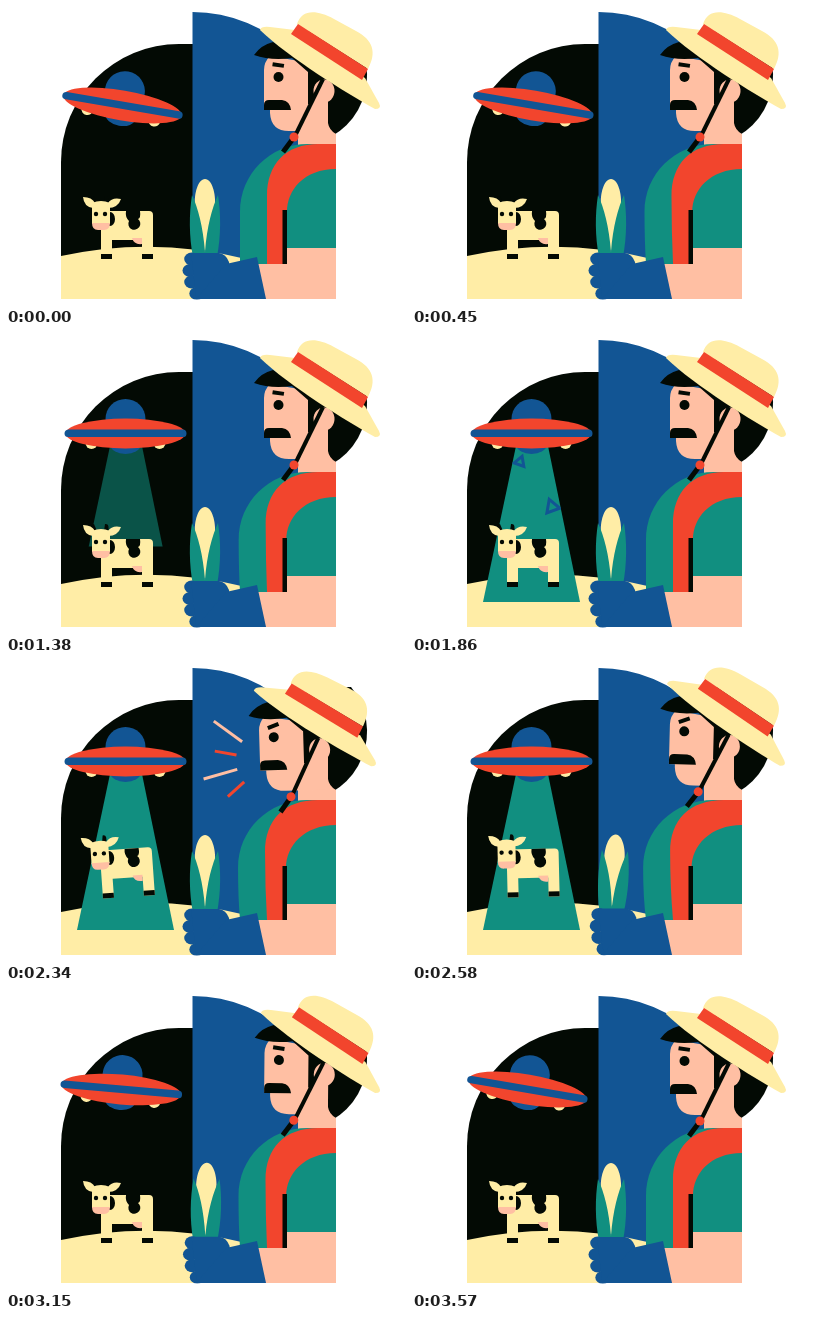
Write an HTML page with a canvas that moves like this. It is 400 px wide and 300 px high and loops after 3600 ms.

```html
<!DOCTYPE html>
<html lang="en">
<head>
<meta charset="utf-8">
<title>Farmer and saucer</title>
<style>
  html, body { margin: 0; width: 100%; height: 100%; overflow: hidden; background: #fff; }
  canvas { display: block; width: 400px; height: 300px; }
</style>
</head>
<body>
<canvas id="stage"></canvas>
<script>
const LOOP = 3600;
const CREAM = '#ffeda6', RED = '#f2452d', BLUE = '#125594', TEAL = '#118f80', PINK = '#ffbfa3', BLACK = '#030a04';

const canvas = document.getElementById('stage');
const ctx = canvas.getContext('2d');
const ratio = window.devicePixelRatio || 1;
canvas.width = 400 * ratio;
canvas.height = 300 * ratio;

// Smooth step from 0 at time a to 1 at time b.
function ease(t, a, b) {
  const p = Math.min(1, Math.max(0, (t - a) / (b - a)));
  return (1 - Math.cos(Math.PI * p)) / 2;
}

// Rises between a and b, falls between c and d.
function pulse(t, a, b, c, d) {
  return ease(t, a, b) - ease(t, c, d);
}

function shape(color, d) {
  ctx.fillStyle = color;
  ctx.fill(new Path2D(d));
}

function rect(color, x, y, w, h) {
  ctx.fillStyle = color;
  ctx.fillRect(x, y, w, h);
}

function oval(color, x, y, rx, ry = rx) {
  ctx.fillStyle = color;
  ctx.beginPath();
  ctx.ellipse(x, y, rx, ry, 0, 0, Math.PI * 2);
  ctx.fill();
}

function line(color, width, x0, y0, x1, y1) {
  ctx.strokeStyle = color;
  ctx.lineWidth = width;
  ctx.beginPath();
  ctx.moveTo(x0, y0);
  ctx.lineTo(x1, y1);
  ctx.stroke();
}

// Runs draw with the picture moved by dx, dy and turned about a pivot.
function posed(dx, dy, angle, px, py, draw) {
  ctx.save();
  ctx.translate(px + dx, py + dy);
  ctx.rotate(angle);
  ctx.translate(-px, -py);
  draw();
  ctx.restore();
}

function background() {
  shape(BLACK, 'M55 293V156A118 118 0 0 1 173 38H188V293Z');
  shape(BLUE, 'M186.5 6A144 144 0 0 1 330 150V293H186.5Z');
  shape(BLACK, 'M300 25H345A70 70 0 0 1 300 139Z');
  shape(CREAM, 'M55 250Q147 230 240 253V293H55Z');
}

function beam(t) {
  const alpha = pulse(t, 1180, 1560, 2640, 2980);
  if (alpha <= 0) return;
  const bottom = 118 + 150 * Math.min(1, Math.max(0, (t - 1230) / 240));
  ctx.save();
  ctx.globalAlpha = alpha;
  ctx.beginPath();
  ctx.rect(60, 110, 120, bottom - 110);
  ctx.clip();
  const cone = 'M104 112H136L168 268H71Z';
  shape(TEAL, cone);
  ctx.clip(new Path2D(cone));
  if (t > 1600 && t < 2300) {
    triangle(108, 128, 6, t, 1);
    triangle(140, 173, 8, t, -1);
  }
  ctx.restore();
}

function triangle(x, y, r, t, spin) {
  const age = t - 1860;
  posed(x, y - age * .12, spin * (.35 + age * .002), 0, 0, () => {
    ctx.strokeStyle = BLUE;
    ctx.lineWidth = 3;
    ctx.beginPath();
    for (let i = 0; i < 3; i++) {
      const a = i * Math.PI * 2 / 3 - Math.PI / 2;
      ctx.lineTo(r * Math.cos(a), r * Math.sin(a));
    }
    ctx.closePath();
    ctx.stroke();
  });
}

function saucer(t) {
  const roaming = 1 - pulse(t, 870, 1220, 2960, 3330);
  const sway = 7 * Math.sin(t / 1200 * Math.PI * 2) - 3;
  posed(119.5 + roaming * sway, 99, roaming * .17, 0, 0, () => {
    oval(BLUE, 0, -14, 20);
    oval(BLUE, 0, 12, 15, 9);
    for (const side of [-1, 1]) oval(CREAM, side * 34, 10, 6);
    oval(RED, 0, .5, 60, 15);
    shape(BLUE, 'M-57 -3.5H57Q61 -3.5 61 .5T57 4H-57Q-61 4 -61 .5T-57 -3.5Z');
  });
}

function cow(t) {
  const lift = pulse(t, 1900, 2240, 2880, 3120);
  const tilt = pulse(t, 1950, 2300, 2340, 2740);
  posed(0, -18 * lift, -.07 * tilt, 118, 225, () => {
    shape(CREAM, 'M95 205H143Q147 205 147 209V253H136V234H106V253H95Z');
    for (const x of [95, 136]) rect(BLACK, x, 248, 11, 5);
    shape(PINK, 'M126 232H136V238Q128 239 126 232Z');
    shape(BLACK, 'M120 205H134Q135 212 132 213A6 6 0 1 1 123 215Q119 211 120 205Z');
    oval(BLACK, 104, 213, 5, 7);
    shape(BLACK, 'M86 198Q83 190 88 190L91 197ZM98 197L99 190Q104 189 102 198Z');
    shape(CREAM, 'M87 202Q78 201 77 191Q86 191 89 197ZM102 197Q106 191 115 193Q112 202 102 202Z');
    shape(CREAM, 'M86 197Q95 193 104 197V218H86Z');
    shape(PINK, 'M86 217H104Q104 224 98 224H92Q86 224 86 217Z');
    for (const x of [90, 99]) oval(BLACK, x, 208, 2.2);
  });
}

// Rays that shoot out of the mouth.
function shout(t) {
  const head = ease(t, 2160, 2300), tail = ease(t, 2360, 2530);
  if (head <= tail) return;
  for (let i = 0; i < 4; i++) {
    const angle = (216 - 26 * i) * Math.PI / 180;
    const reach = i % 2 ? 22 : 35;
    const at = p => [262 + (32 + reach * p) * Math.cos(angle), 98.5 + (32 + reach * p) * Math.sin(angle)];
    line(i % 2 ? RED : PINK, 3, ...at(tail), ...at(head));
  }
}

function body(t) {
  const s = 3 * (1 - Math.cos(t / 1800 * Math.PI * 2)) / 2;
  rect(PINK, 250, 241, 80, 52);
  shape(PINK, 'M292 110V140H330V128Q323 124 322 117V88H300Z');
  shape(TEAL, `M234 258Q${234 - s} 235 ${234 - s} 206C${234 - s} 168 ${264 - s} 138 302 138H330V242H281V258Z`);
  shape(RED, `M261 258Q${261 - s} 225 ${261 - s} 190C${261 - s} 158 ${280 - s} 138 312 138H330V163C298 163 ${281 - s / 2} 184 ${281 - s / 2} 206L281 258Z`);
  rect(BLACK, 276.5, 204, 4.5, 54);
}

function corn() {
  shape(CREAM, 'M199 173C206 173 210 188 209 199C208 220 203 236 199 246C195 236 190 220 189 199C188 188 192 173 199 173Z');
  shape(TEAL, 'M186 189C192 202 197 220 199 246C201 220 206 202 212 189C215 208 215 230 211 251H187C183 230 183 208 186 189Z');
}

function hand(t) {
  const raise = pulse(t, 2320, 2780, 2880, 3280);
  posed(raise, -raise, raise * .09, 200, 250, corn);
  posed(raise * 2, -raise, 0, 0, 0, () => {
    for (let i = 0; i < 4; i++) oval(BLUE, 184 + 1.7 * (i - 1) ** 2, 253 + 11.5 * i, 7.5, 6.5);
    shape(BLUE, 'M185 247H213Q220 248 223 256L228 290H190Z');
  });
  shape(BLUE, 'M220 258L251 251L260 293H190Z');
}

function hat() {
  shape(CREAM, 'M254 24Q255 20 264 21L289 24L359 72L373 97Q376 103 369 103C342 88 283 52 254 24Z');
  shape(CREAM, 'M291 18C296 4 309 3 328 13L350 25C367 34 371 46 362 63Z');
  shape(RED, 'M292 18L362 63L356 74L285 28Z');
}

function head(t) {
  const lean = pulse(t, 1900, 2180, 2420, 2700);
  const rear = pulse(t, 2420, 2700, 2830, 3270);
  const anger = pulse(t, 1980, 2180, 2850, 3150);
  posed(-3 * lean - rear, 3 * lean - 3 * rear, .06 * rear - .03 * lean, 310, 130, () => {
    shape(PINK, 'M264 50Q258 56 258 64V104H264V107Q265 125 283 125H322V60Z');
    shape(BLACK, 'M248 49Q255 39 267 36L328 74H316L304 98H302V66L286 52Q265 55 248 49Z');
    oval(PINK, 318, 85, 10.5, 11.5);
    line(BLACK, 4, 317, 73, 289, 130);
    line(BLACK, 5, 289, 130, 277, 146);
    oval(RED, 288, 131, 4.5);
    oval(BLACK, 272.5, 71, 5);
    posed(0, anger, .15 - anger * .5, 272, 59, () => line(BLACK, 4, 266.5, 59, 278, 59));
    shape(BLACK, 'M258 104V99Q258 94 263 94H276Q284 95 285 104Z');
    hat();
  });
}

function frame(t) {
  ctx.setTransform(ratio, 0, 0, ratio, 0, 0);
  rect('#fff', 0, 0, 400, 300);
  ctx.save();
  ctx.beginPath();
  ctx.rect(0, 0, 400, 293.5);
  ctx.clip();
  for (const part of [background, beam, cow, saucer, shout, body, hand, head]) part(t);
  ctx.restore();
}

const start = performance.now();
function tick() {
  frame((performance.now() - start) % LOOP);
  requestAnimationFrame(tick);
}
tick();
</script>
</body>
</html>
```
